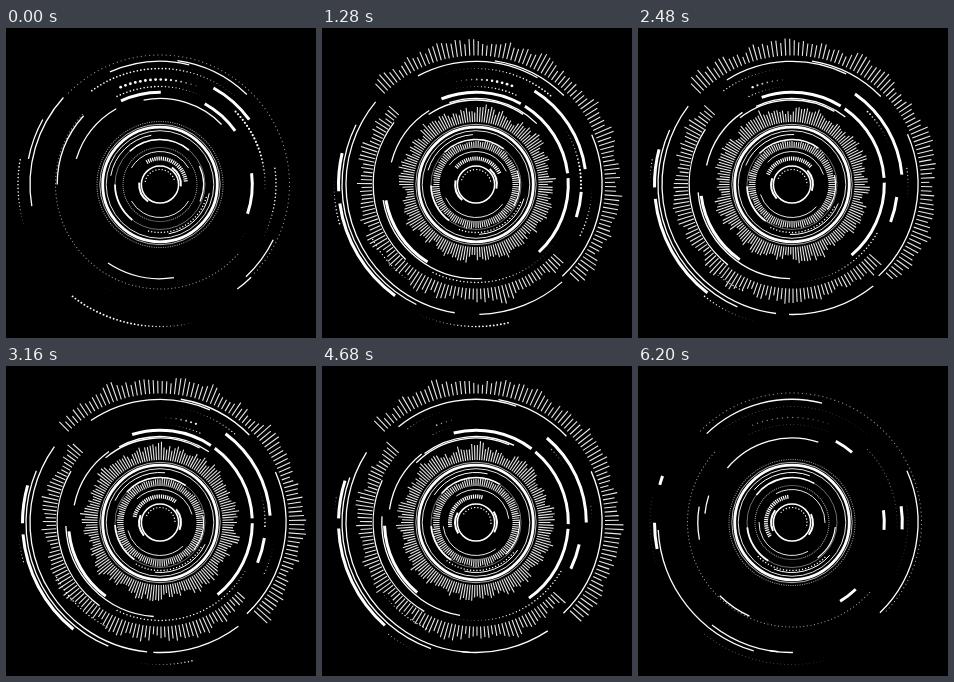
These frames come from a looping animation (310 by 310 pixels, 6.24 s). An HTML page with a canvas:

```html
<!DOCTYPE html>
<html lang="en">
<head>
<meta charset="utf-8">
<title>Radial interface</title>
<style>
html, body { margin: 0; width: 100%; height: 100%; overflow: hidden; background: #000; }
canvas { display: block; width: 310px; height: 310px; }
</style>
</head>
<body>
<canvas id="stage" width="310" height="310"></canvas>
<script>
const LOOP = 6240, STEP = 40, RAD = Math.PI / 180;
const ctx = document.getElementById('stage').getContext('2d');

// radius, start angle, sweep, visible share at start, at end, degrees per second
const bold = [
  [110.3, -61, 50],
  [91.5, 119, 48, 0, 0],
  [137.5, 124, 46, 0, 0.24, 1.6],
  [137.5, 175.5, 16, 0, 0.24, 1.33],
  [105.5, 1, 14, 0, 0]
];
for (let i = 0; i < 3; i++) bold.push([92.3, 54 * i - 115, 51]);

const thin = [
  [102.8, 222, -84, 0.5, 0.24, -3.8],
  [94.2, 81.5, 84, 0.5, 0.24, 3.9],
  [87.5, 240, -43, 1, 0.28, -1.8],
  [86, 259, 63, 0.9, 0, -5.5],
  [84.5, 240, 68, 0, 1, -3.2],
  [130, 45.5, 40, 0.2, 0.1],
  [130, 222, -120, 0.43, 0.32, -2],
  [134, 209, -90, 0.2, 0.78, -2],
  [123.2, -114, 58, 0.65, 1, -3.2],
  [125, -82, 36, 1, 0, 0.5],
  [126, 47, -70, 0.3, 1, -0.2]
];

// radius, first angle, last angle, dot size
const dots = [
  [116, -126, -50, 1.7],
  [105, -112, -70, 2.8],
  [98, -116, -66, 1.6],
  [105, -44, 2, 2.2],
  [116, -8, 26, 1.6],
  [142, 128, 77, 1.9],
  [142, 190, 164, 1.6]
];
const lateDots = [[117, 152, 115, 1.4], [98, 116, 30, 1.5]];

// radius, first angle, sweep, count, mean height
const spectra = [
  [129, 225, 180, 98, 13],
  [104, 42, 182, 92, 12],
  [62.5, 0, 360, 170, 12],
  [36.5, 0, 360, 116, 6]
];

const clamp = x => Math.max(0, Math.min(1, x));
const easeOut = x => 1 - (1 - clamp(x)) ** 3;
const hash = n => { const s = Math.sin(n * 127.1) * 43758.5453; return s - Math.floor(s); };

function arc(r, w, from, to) {
  ctx.lineWidth = w;
  ctx.beginPath();
  ctx.arc(0, 0, r, from * RAD, to * RAD, to < from);
  ctx.stroke();
}

function drawArc(t, w, [r, start, sweep, first = 0.5, last = 0.24, rate = 2.35]) {
  const a = start + rate * t / 1000;
  const head = first + (1 - first) * easeOut(t / 640);
  const tail = (1 - last) * clamp((t - 5500) / 700) ** 2;
  if (head - tail > 0.005) arc(r, w, a + sweep * tail, a + sweep * head);
}

function drawDots(t, phase, [r, from, to, size]) {
  const p = t / LOOP * 3 + phase;
  const fade = 1 - 0.75 * clamp((t - 5650) / 500);
  const gap = size > 2.5 ? 5.1 : 3.6;
  const count = Math.round(Math.abs(to - from) * RAD * r / gap);
  for (let i = 0; i <= count; i++) {
    const u = i / count, a = (from + (to - from) * u) * RAD;
    const wave = 0.3 + 0.7 * Math.cos(2 * Math.PI * (p - 0.05 + 0.3 * u));
    const level = clamp(wave * 1.3) * fade;
    if (level < 0.03) continue;
    ctx.globalAlpha = Math.min(1, 0.25 + level);
    ctx.beginPath();
    ctx.arc(r * Math.cos(a), r * Math.sin(a), size / 2 * (0.35 + 0.65 * level), 0, 7);
    ctx.fill();
  }
  ctx.globalAlpha = 1;
}

function drawSpectrum(t, [r, from, sweep, count, mean]) {
  const env = easeOut(t / 600) * (1 - clamp((t - 5600) / 560) ** 2);
  const s = t / LOOP * 2 * Math.PI;
  const swing = mean > 10 ? 4.8 : 1.2;
  ctx.lineWidth = 1.1;
  ctx.globalAlpha = 0.6 + 0.3 * env;
  ctx.beginPath();
  for (let i = 0; i < count; i++) {
    const a = (from + sweep * i / count) * RAD;
    const noise = 0.45 * Math.sin(i * 0.31 + s * 4 + r) +
      0.35 * Math.sin(i * 0.83 - s * 5) +
      0.5 * Math.sin(hash(i + r) * 6.3 + s * 6);
    const h = 1 + env * Math.max(2, mean + swing * noise);
    ctx.moveTo(r * Math.cos(a), r * Math.sin(a));
    ctx.lineTo((r + h) * Math.cos(a), (r + h) * Math.sin(a));
  }
  ctx.stroke();
  ctx.globalAlpha = 1;
}

function drawCore(t) {
  const turn = t / 200;
  arc(57.3, 2.8, 0, 360);
  arc(53.8, 0.9, 0, 360);
  arc(60.2, 0.7, 0, 360);
  arc(18.6, 1.5, 0, 360);
  ctx.globalAlpha = 0.55;
  arc(45, 0.8, 0, 360);
  ctx.globalAlpha = 1;
  arc(45, 1.8, 128 - turn / 5, 180 - turn / 5);
  arc(45, 1.6, 228 - turn / 3, 310 - turn / 3);
  arc(43.5, 1.2, turn - 25, turn + 23);
  for (const side of [0, 180]) {
    arc(20.8, 2, side + turn - 55, side + turn + 5);
    arc(33, 0.9, side + turn + 30, side + turn + 150);
    arc(50, 1, side + turn + 10, side + turn + 80);
  }
  ctx.setLineDash([1.2, 0.9]);
  const a = 239 - 14.7 * t / 1000;
  arc(26, 4, a, a + 115);
  ctx.setLineDash([1.2, 2]);
  arc(15, 1.2, 190 + turn, 350 + turn);
  arc(48, 1.3, 15 + turn, 105 + turn);
  ctx.setLineDash([]);
}

function draw(t) {
  ctx.setTransform(1, 0, 0, 1, 0, 0);
  ctx.fillStyle = '#000';
  ctx.fillRect(0, 0, 310, 310);
  ctx.translate(154, 156.5);
  ctx.fillStyle = ctx.strokeStyle = '#fff';
  spectra.forEach(s => drawSpectrum(t, s));
  dots.forEach(d => drawDots(t, 0.04, d));
  lateDots.forEach(d => drawDots(t, 0.46, d));
  thin.forEach(a => drawArc(t, 1.3, a));
  bold.forEach(a => drawArc(t, 3, a));
  drawCore(t);
}

const begin = performance.now();
function frame() {
  const t = (performance.now() - begin) % LOOP;
  draw(Math.floor(t / STEP) * STEP);
  requestAnimationFrame(frame);
}
frame();
</script>
</body>
</html>
```
